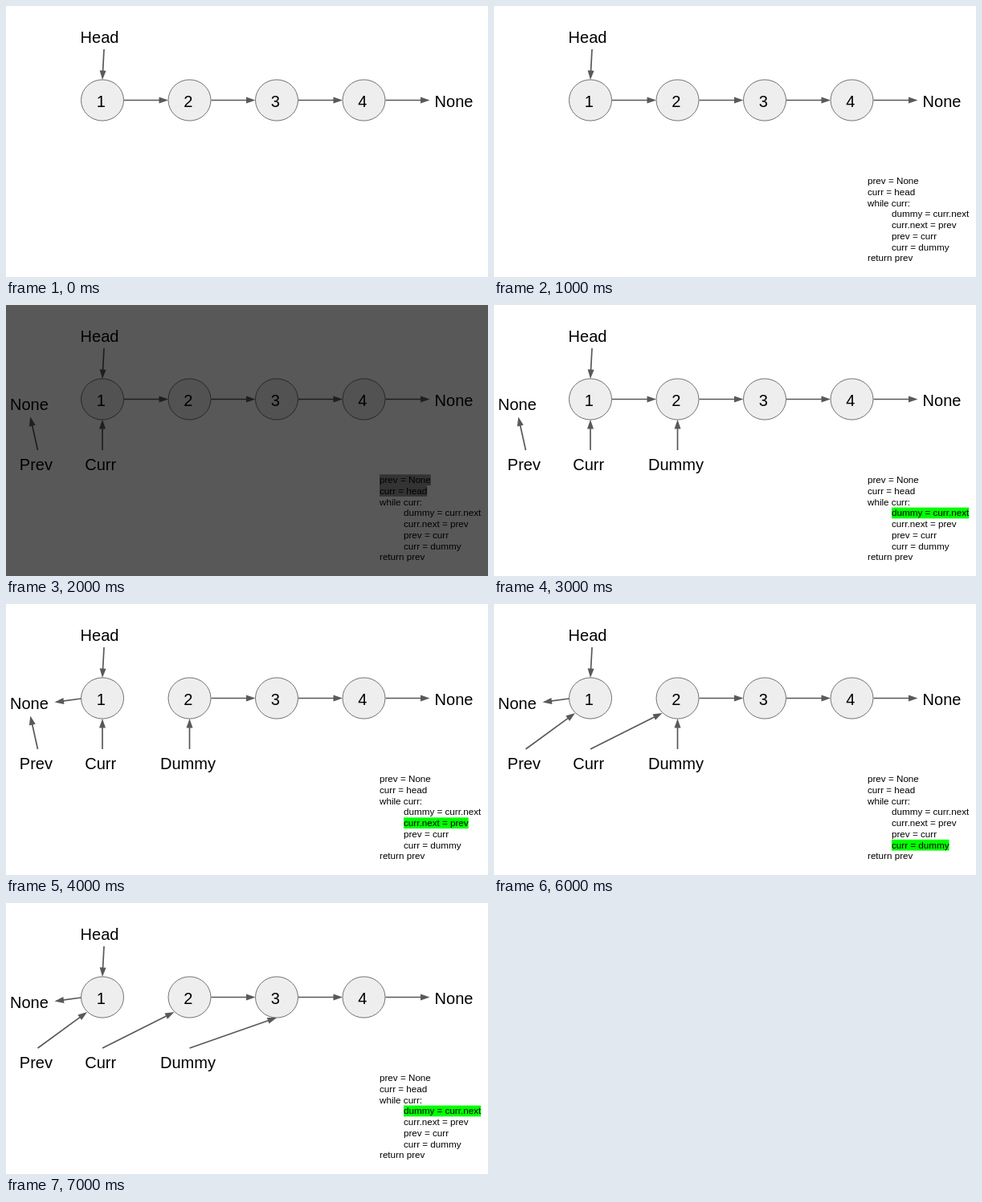
Write an HTML page with a canvas that moves like this. It is 600x338 px and loops after 8000 ms.

```html
<!DOCTYPE html>
<html lang="en">
<head>
<meta charset="utf-8">
<title>Reversing a linked list</title>
<style>
  html, body { margin: 0; width: 100%; height: 100%; overflow: hidden; background: #fff; }
  canvas { display: block; width: 600px; height: 338px; }
</style>
</head>
<body>
<canvas id="stage" width="600" height="338"></canvas>
<script>
const ctx = document.getElementById('stage').getContext('2d');
const FONT = '"Liberation Sans", Arial, sans-serif';
const GREY = '#595959';
const STEP_MS = 1000, STEPS = 8;

const NODE_Y = 117.5, LABEL_Y = 206;
const nodeX = i => 120 + 108.5 * i;

const CODE = [
  'prev = None', 'curr = head', 'while curr:',
  '\tdummy = curr.next', '\tcurr.next = prev', '\tprev = curr', '\tcurr = dummy',
  'return prev'
];
// Highlighted code lines for each step
const ACTIVE = [[], [], [0, 1], [3], [4], [5], [6], [3]];

function label(text, x, y, align = 'left') {
  ctx.font = '20px ' + FONT;
  ctx.textAlign = align;
  ctx.fillStyle = '#000';
  ctx.fillText(text, x, y);
}

function arrow(x1, y1, x2, y2) {
  const length = Math.hypot(x2 - x1, y2 - y1);
  ctx.save();
  ctx.translate(x1, y1);
  ctx.rotate(Math.atan2(y2 - y1, x2 - x1));
  ctx.strokeStyle = ctx.fillStyle = GREY;
  ctx.lineWidth = 1.7;
  ctx.beginPath();
  ctx.moveTo(0, 0);
  ctx.lineTo(length - 10, 0);
  ctx.stroke();
  ctx.beginPath();
  ctx.moveTo(length, 0);
  ctx.lineTo(length - 11.5, -4);
  ctx.lineTo(length - 11.5, 4);
  ctx.fill();
  ctx.restore();
}

function node(i) {
  ctx.beginPath();
  ctx.ellipse(nodeX(i), NODE_Y, 26.5, 25.6, 0, 0, Math.PI * 2);
  ctx.fillStyle = '#eee';
  ctx.fill();
  ctx.strokeStyle = GREY;
  ctx.lineWidth = 0.85;
  ctx.stroke();
  label(i + 1, nodeX(i) - 1.8, 125.5, 'center');
}

function list(step) {
  label('Head', 92.6, 45.5);
  arrow(122, 54, 120, 92);
  for (let i = 0; i < 4; i++) {
    node(i);
    if (i > 0 || step < 4) arrow(nodeX(i) + 27, NODE_Y, nodeX(i) + 82, NODE_Y);
  }
  label('None', 533.6, 125.8);
  if (step >= 4) arrow(93.5, 118, 60.5, 122.5);
}

function pointers(step) {
  if (step < 2) return;
  label('None', 5, 130.8);
  label('Prev', 16.8, LABEL_Y);
  label('Curr', 98.3, LABEL_Y);
  if (step < 5) arrow(39.5, 181, 30.3, 139.5);
  else arrow(39.5, 181, 101, 136);
  if (step < 6) arrow(120, 181, 120, 143);
  else arrow(120, 181, 209.5, 136);

  if (step < 3) return;
  label('Dummy', 192, LABEL_Y);
  if (step < 7) arrow(228.5, 181, 228.5, 143);
  else arrow(228.5, 181, 337, 143);
}

function code(step, highlight) {
  if (step < 1) return;
  ctx.font = '11.67px ' + FONT;
  ctx.textAlign = 'left';
  CODE.forEach((line, i) => {
    const text = line.trim();
    const x = line === text ? 465 : 495;
    const y = 222 + 13.75 * i;
    if (ACTIVE[step].includes(i)) {
      ctx.fillStyle = highlight;
      ctx.fillRect(x, y - 10.7, ctx.measureText(text).width, 13.75);
    }
    ctx.fillStyle = '#000';
    ctx.fillText(text, x, y);
  });
}

function draw(now) {
  const step = Math.floor(now / STEP_MS) % STEPS;
  const dimmed = step === 2;
  ctx.fillStyle = '#fff';
  ctx.fillRect(0, 0, 600, 338);
  list(step);
  pointers(step);
  code(step, dimmed ? '#959595' : '#0f0');
  if (dimmed) {
    ctx.fillStyle = 'rgba(0, 0, 0, 0.655)';
    ctx.fillRect(0, 0, 600, 338);
  }
}

const start = performance.now();
function tick() {
  draw(performance.now() - start);
  requestAnimationFrame(tick);
}
tick();
</script>
</body>
</html>
```
